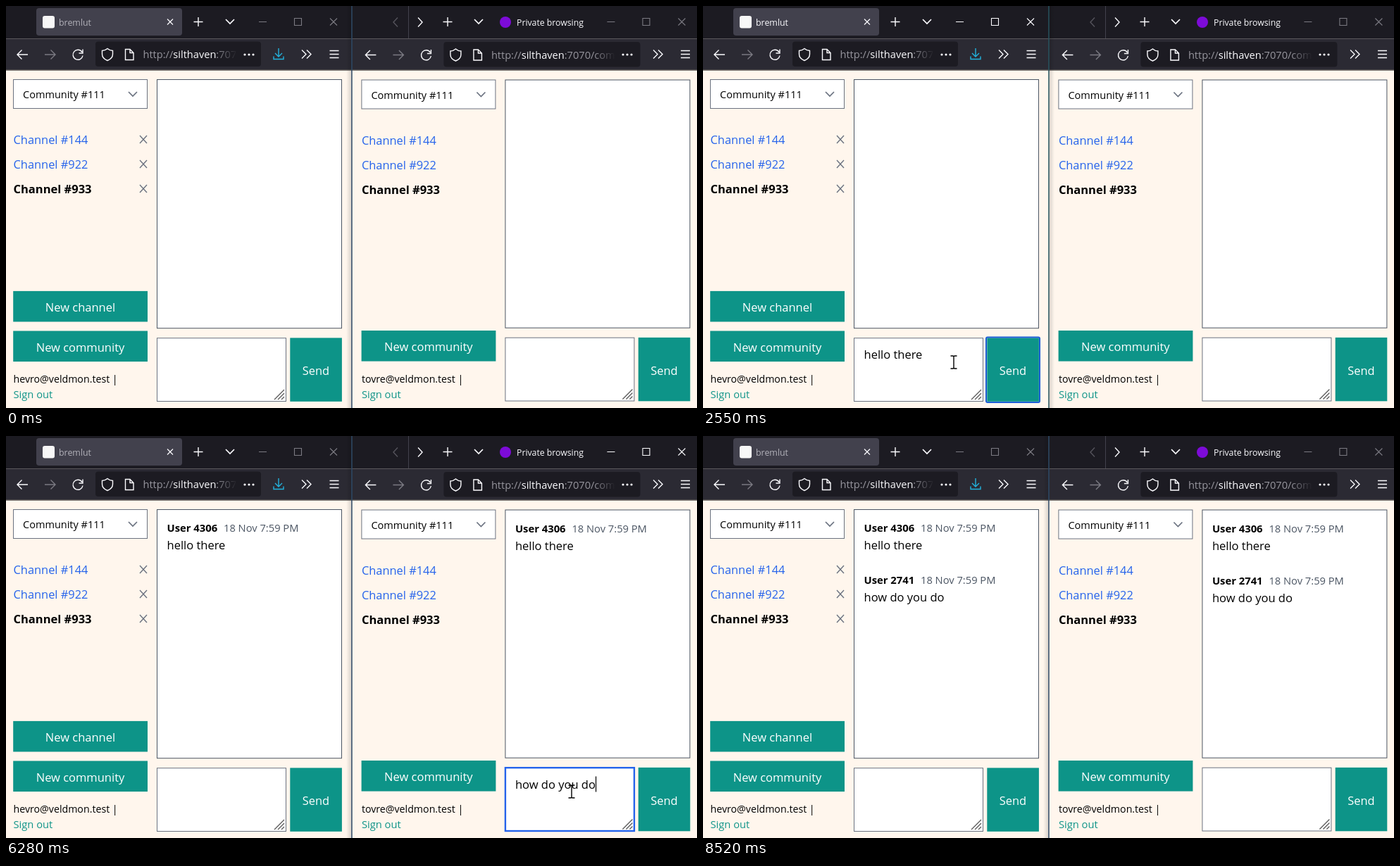
These frames come from a looping animation (981x571 px, 8670 ms). An HTML page:

```html
<!DOCTYPE html>
<html lang="en">
<head>
<meta charset="utf-8">
<title>Chat demo</title>
<style>
html, body { margin: 0; width: 100%; height: 100%; overflow: hidden; background: #fff6ed; }
svg { display: block; }
text { font-family: 'Open Sans', 'Noto Sans', sans-serif; white-space: pre; }
path { fill: none; stroke-width: 1.4; }
</style>
</head>
<body>
<svg id="stage" width="981" height="571" viewBox="0 0 981 571"></svg>
<script>
const LOOP = 8670, STEP = 76.5, SHIFT = 494.4;
const BAR = '#1c1b22', TEAL = '#0d9488', DARK_TEAL = '#115e59', BLUE = '#2563eb';
const GREY = '#6b7280', SLATE = '#4b5563', LIGHT = '#fbfbfe', DIM = '#7b7a82';

const rect = (x, y, w, h, fill, extra = '') =>
  `<rect x="${x}" y="${y}" width="${w}" height="${h}" fill="${fill}" ${extra}/>`;
const text = (x, y, size, str, fill = '#000', extra = '') =>
  `<text x="${x}" y="${y}" font-size="${size}" fill="${fill}" ${extra}>${str}</text>`;
const path = (d, color, style = '') => `<path d="${d}" stroke="${color}" style="${style}"/>`;
const at = (x, y, body, extra = '') => `<g transform="translate(${x} ${y})" ${extra}>${body}</g>`;
const frame = (x, y, w, h, color, extra = '') => rect(x, y, w, h, '#fff', `stroke="${color}" ${extra}`);
const BOLD = 'font-weight="700"', MID = 'text-anchor="middle"';

const plus = x => path(`M${x - 6.5} 22.5h13m-6.5-6.5v13`, LIGHT);
const chevron = (x, y, color) => path(`M${x - 6} ${y - 3}l6 6l6-6`, color, 'stroke-width:1.7');

function titleBar(i) {
  const own = i
    ? path('M556 16.5l-6 6.5l6 6.5', '#55545c') + path('M571.5 0v46', '#42414d', 'stroke-width:1') +
      path('M585 16.5l6 6.5l-6 6.5', LIGHT) + plus(627) + chevron(671, 22, LIGHT) +
      '<circle cx="709" cy="23" r="8" fill="#7d0bd8"/>' + text(725, 28, 12.25, 'Private browsing', LIGHT)
    : rect(43, 3, 207, 39, '#42414d', 'rx="4"') + rect(52, 14, 17, 17.5, '#f7f7f7', 'rx="3"') +
      text(75, 28, 12.4, 'bremlut', LIGHT, 'id="tab"') +
      path('M229 18.5l8 8m0-8l-8 8', LIGHT, 'stroke-width:1.2') + plus(273) + chevron(318, 22, LIGHT);
  const controls = path('M359 22.5h11M409.5 17.5h10v10h-10zM460 17.5l10 10m0-10l-10 10', '',
    'stroke:inherit;stroke-width:1.1');
  return own + at(SHIFT * i, 0, controls, `id="controls${i}"`);
}

function toolBar(i) {
  const x = SHIFT * i, end = i ? 865 : 328, dots = i ? 882 : 345, more = i ? 925 : 426, menu = i ? 964.5 : 466;
  const left = path('M31 69h-15m6.5-6.5l-6.5 6.5l6.5 6.5', LIGHT) +
    path('M55 69h15m-6.5-6.5l6.5 6.5l-6.5 6.5', DIM) +
    path('M108 65.5a7 7 0 1 0 1 5M109 61.5v5.5h-5.5', LIGHT) +
    rect(127, 50.5, i ? 279 : 235, 35.5, BAR, 'rx="4"') +
    path('M144 60.5q3.5 3 7.5 3v5q0 6-7.5 9q-7.5-3-7.5-9v-5q4 0 7.5-3z', LIGHT) +
    path('M169.5 61.5h6.5l5 5v10h-11.5zM176 61.5v5h5', LIGHT);
  const url = text(194.5 + x, 74 + i / 2, 14.6,
    `http://<tspan fill="${LIGHT}">silthaven</tspan>:7070/${i ? 'comm' : ''}`, '#96959d');
  return at(x, i / 2, left) + url + rect(end - 30, 53, 50, 31, 'url(#fade)') +
    [-6, 0, 6].map(d => `<circle cx="${dots + d}" cy="69" r="1.6" fill="${LIGHT}"/>`).join('') +
    (i ? '' : path('M387 60v12m-5-5l5 5l5-5M380 71.5v4h14v-4', '#22b2dc')) +
    path(`M${more - 6} 62.5l6 6l-6 6m7-12l6 6l-6 6`, LIGHT) +
    path(`M${menu - 6.5} 63.5h13m-13 5h13m-13 5h13`, LIGHT);
}

function message(x, y, user, str) {
  return text(x, y, 14.8, user, '#000', BOLD) + text(x + 80.5, y, 14.7, '18 Nov 7:59 PM', SLATE) +
    text(x, y + 25, 16.5, str);
}

function page(i) {
  const x = SHIFT * i, down = i / 2;
  const button = (y, label) => rect(10.2 + x, y - down, 190.8, 43.6, TEAL) +
    text(105.5 + x, y + 29 - down, 16.5, label, '#fff', MID);
  let out = frame(10.5 + x, 104.5 + down, 190, 41, GREY) +
    text(24 + x, 131 + down, 14.5, 'Community #111') + chevron(180 + x, 125 + down, GREY);
  ['144', '922', '933'].forEach((n, k) => {
    const y = 196 + 35 * k, last = k == 2;
    out += text(10.5 + x, y + down, last ? 16.5 : 16.4, 'Channel #' + n, last ? '#000' : BLUE, last ? BOLD : '');
    if (!i) out += path(`M190 ${y - 12}l10 11m0-11l-10 11`, GREY);
  });
  if (!i) out += button(404.9, 'New channel');
  return out + button(461.5, 'New community') +
    text(10.5 + x, 535 - down, 14.2, (i ? 'tovre' : 'hevro') + '@veldmon.test |') +
    text(10.5 + x, 557 - down, 14.7, 'Sign out', TEAL) +
    frame(214.5 + x, 104.5 + down, 262, 353.2 - i, SLATE) +
    `<g class="first">${message(228.5 + x, 136 + down, 'User 4306', 'hello there')}</g>` +
    `<g class="second">${message(228.5 + x, 210 + down, 'User 2741', 'how do you do')}</g>` +
    frame(214.5 + x, 471.7 - down, 183, 89.8, GREY, `id="area${i}"`) +
    path(`M${381 + x} ${559 - down}l14-14m-9 14l9-9m-4 9l4-4`, '#555', 'stroke-width:1.2') +
    text(228.5 + x, 501, 16.5, '', '#000', `id="typed${i}"`) +
    rect(0, 484 - down, 1.2, 22, '#000', `id="caret${i}"`) +
    rect(403.3 + x, 471.4 - down, 73.6, 90.4, TEAL, `id="send${i}"`) +
    text(440 + x, 524 - down, 16.4, 'Send', '#fff', MID);
}

const stage = document.getElementById('stage');
stage.innerHTML =
  `<defs><linearGradient id="fade"><stop stop-color="${BAR}" stop-opacity="0"/>` +
  `<stop offset=".6" stop-color="${BAR}"/></linearGradient>` +
  '<linearGradient id="shade"><stop stop-opacity=".16"/><stop offset="1" stop-opacity="0"/></linearGradient></defs>' +
  rect(0, 0, 981, 571, '#fff6ed') + rect(0, 0, 981, 46.5, BAR) + rect(0, 46.5, 981, 44, '#2b2a33') +
  rect(0, 90.5, 981, 1, '#0c0c0d') +
  [0, 1].map(i => titleBar(i) + toolBar(i) + page(i)).join('') +
  rect(402, 470.5, 76, 92.5, 'none', 'id="ring" rx="2" stroke="#1d5fd6" stroke-width="2"') +
  rect(0, 0, 8, 571, 'url(#shade)', 'id="shadow"') +
  rect(490.2, 0, 1.5, 571, '#2f4a66', 'id="divider"') +
  at(0, 0, path('M0 0V17L4 13.5L6.5 20L9 19L6.5 12.5H12Z', '#000', 'fill:#fff;stroke-width:1'), 'id="arrow"') +
  at(0, 0, path('M-2 2Q-2 0 0 0T2 2V9Q4 8 5 9Q7 8.5 8 10Q10.5 9.5 10.5 12V17Q10.5 21 8.5 24H-1Q-2 21-6 16Q-6.5 13-4 13.5L-2 15.5Z',
    '#000', 'fill:#fff;stroke-width:1'), 'id="hand"') +
  at(0, 0, path('M-4.5-9h3.5l1 1l1-1h3.5M0-8v16M-4.5 9h3.5l1-1l1 1h3.5', '#000'), 'id="beam"');

const $ = id => document.getElementById(id);
const set = (el, attrs) => { for (const k in attrs) el.setAttribute(k, attrs[k]); };
const show = (el, on) => { el.style.display = on ? '' : 'none'; };
const within = (t, a, b) => t >= a && t < b;

// Pointer paths: start time, then one position per step; the last one holds.
const paths = [
  [0, [-99, -99]],
  [200, [706, 457], [590, 470], [487, 486], [394, 499], [363, 505], [356, 506]],
  [3820, [409, 506], [470, 508], [612, 505], [748, 506], [794, 507]],
  [6280, [803, 505], [838, 501], [888, 498], [934, 495], [968, 494], [974, 493], [968, 497], [957, 502], [948, 503]],
  [7760, [951, 504], [952, 520], [953, 540], [954, 563], [-99, -99]]
];
// Typing bursts: start time and number of keys.
const panes = [
  { str: 'hello there', bursts: [[1360, 3], [1670, 4], [2070, 4]], sent: 2870, active: [750, 4205], focus: [820, 2550] },
  { str: 'how do you do', bursts: [[4740, 6], [5280, 2], [5510, 3], [5820, 2]], sent: 7210, active: [4205, 8520], focus: [4280, 7130] }
];

const stepsSince = (t, start) => Math.floor((t - start) / STEP);

function pointer(t) {
  const [start, ...points] = paths.filter(p => p[0] <= t).pop();
  return points[Math.min(stepsSince(t, start), points.length - 1)];
}

function render(t) {
  const [px, py] = pointer(t);
  const inRow = py > 470 && py < 562;
  const overSend = [0, 1].map(i => inRow && within(px - SHIFT * i, 403, 477));
  const overArea = inRow && [0, 1].some(i => within(px - SHIFT * i, 214, 398));
  const kind = overSend[0] || overSend[1] ? 'hand' : overArea ? 'beam' : 'arrow';
  for (const id of ['arrow', 'hand', 'beam']) show($(id), id == kind);
  set($(kind), { transform: `translate(${px} ${py})` });

  panes.forEach((p, i) => {
    const focused = within(t, ...p.focus);
    const count = p.bursts.reduce((n, [start, keys]) =>
      n + Math.max(0, Math.min(keys, stepsSince(t, start) + 1)), 0);
    const typed = $('typed' + i), caret = $('caret' + i);
    const str = t < p.sent ? p.str.slice(0, count) : '';
    if (typed.textContent != str) typed.textContent = str;
    set($('controls' + i), { stroke: within(t, ...p.active) ? LIGHT : DIM });
    set($('area' + i), { stroke: focused ? BLUE : GREY, 'stroke-width': focused ? 2.4 : 1 });
    show(caret, focused && !within(t, 1280, 1360));
    set(caret, { x: 228.5 + SHIFT * i + (str ? typed.getComputedTextLength() : 0) });
    // The hover colour lags one step behind the pointer on arrival.
    set($('send' + i), { fill: overSend[i] && !within(t, 3820, 3896) ? DARK_TEAL : TEAL });
  });

  // The window in front casts a thin shadow on its neighbour.
  const leftActive = within(t, ...panes[0].active);
  set($('tab'), { fill: leftActive ? LIGHT : '#b3b2ba' });
  set($('divider'), { fill: leftActive ? '#28545f' : '#2f4a66' });
  set($('shadow'), { transform: leftActive ? 'translate(491 0)' : 'translate(491 0) scale(-1 1)' });
  show($('ring'), within(t, 2550, 4205));
  document.querySelectorAll('.first').forEach(g => show(g, t >= panes[0].sent));
  document.querySelectorAll('.second').forEach(g => show(g, t >= panes[1].sent));
}

const begin = performance.now();
function tick() {
  render((performance.now() - begin) % LOOP);
  requestAnimationFrame(tick);
}
tick();
</script>
</body>
</html>
```
